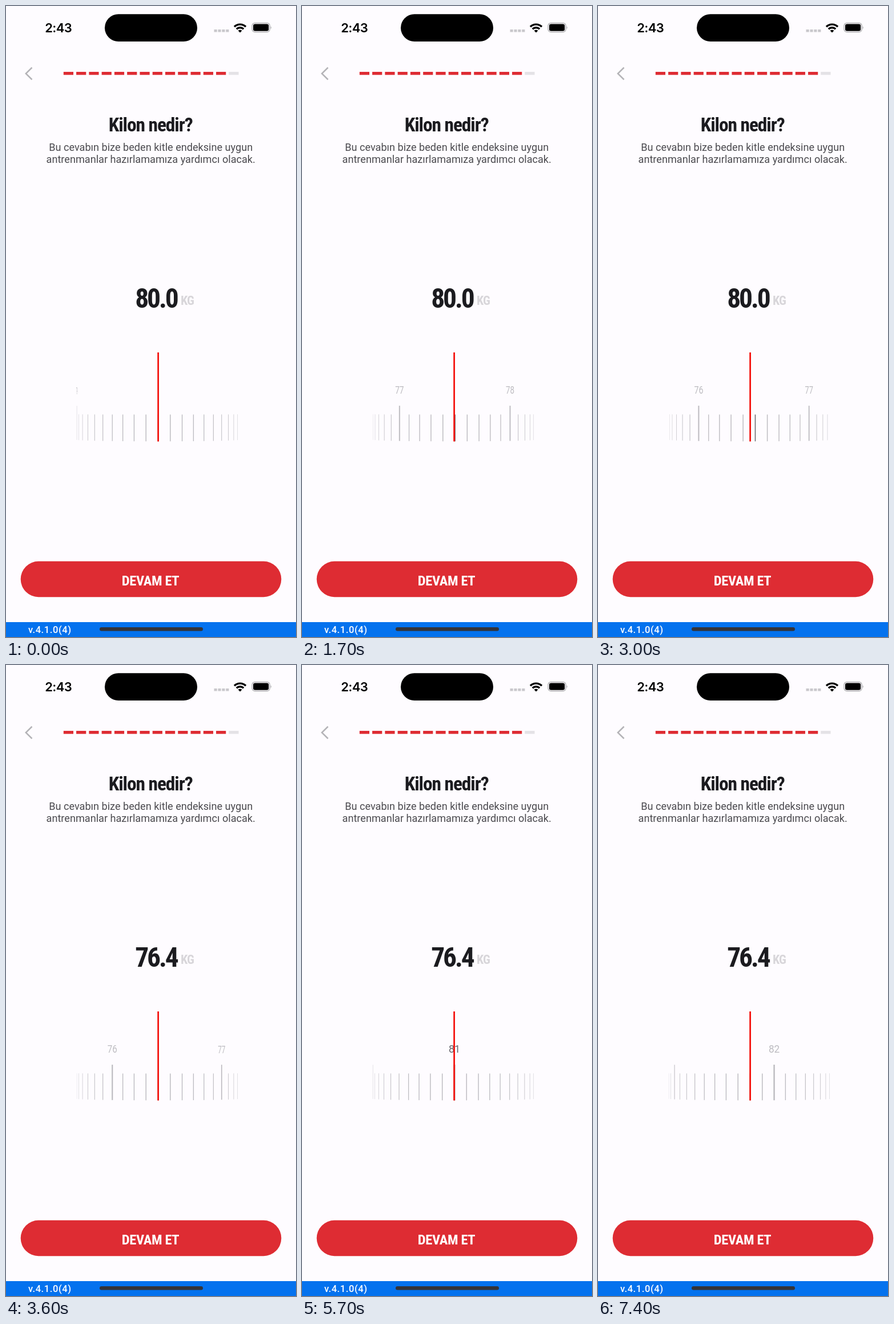
These frames come from a looping animation (508x1102 px, 7.5 s). An HTML page:

```html
<!DOCTYPE html>
<html lang="tr">
<head>
<meta charset="utf-8">
<title>Kilon nedir?</title>
<style>
  html, body { margin: 0; width: 100%; height: 100%; overflow: hidden; background: #fefcff; }
  svg { display: block; width: 508px; height: 1102px; font-family: Roboto, sans-serif; }
  .narrow { font-family: "Roboto Condensed", Roboto, sans-serif; font-stretch: 75%; font-weight: 700; fill: #1b1b1f; }
  .mid { text-anchor: middle; }
</style>
</head>
<body>
<svg viewBox="0 0 508 1102">
  <!-- status bar -->
  <text x="68.2" y="46" font-family="Inter, sans-serif" font-size="22" font-weight="600" letter-spacing="-.6">2:43</text>
  <rect x="173" y="14.3" width="162" height="47.8" rx="23.9"/>
  <path d="M364.5 43.3H391" stroke="#c9c8cc" stroke-width="4.6" stroke-dasharray="5.2 1.7"/>
  <g fill="none" stroke="#000" stroke-width="3.4">
    <path d="M400 36.2a14.4 14.4 0 0 1 20 0"/>
    <path d="M403.8 40.2a9 9 0 0 1 12.4 0"/>
  </g>
  <path d="M410 46.5l-3.4-3.5a4.9 4.9 0 0 1 6.8 0z"/>
  <rect x="431.1" y="29.6" width="31" height="16" rx="5" fill="none" stroke="#a9a8ac" stroke-width="1.3"/>
  <rect x="433" y="31.5" width="27.2" height="12.2" rx="3.3"/>
  <path d="M463.7 35.2q2.4 2.4 0 5z" fill="#a9a8ac"/>

  <!-- header -->
  <path d="M45.5 107.5L34.8 118l10.7 10.5" fill="none" stroke="#b4b3b7" stroke-width="2.5"/>
  <g id="steps"></g>
  <text class="narrow mid" x="253.2" y="219" font-size="33.5" letter-spacing="-1.1">Kilon nedir?</text>
  <g class="mid" font-size="18.13" fill="#4b4a4f">
    <text x="253.7" y="253">Bu cevabın bize beden kitle endeksine uygun</text>
    <text x="253.7" y="274">antrenmanlar hazırlamamıza yardımcı olacak.</text>
  </g>

  <!-- weight and ruler -->
  <text id="weight" class="narrow" x="299.7" y="527" font-size="47.5" letter-spacing="-3.1" text-anchor="end"></text>
  <text class="narrow" x="306" y="522" font-size="22" letter-spacing="-.8" style="fill:#d8d6da">KG</text>
  <clipPath id="window"><rect x="123" y="600" width="284" height="170"/></clipPath>
  <g clip-path="url(#window)"><g id="ruler" class="mid" font-size="18"></g></g>
  <rect x="265.2" y="605" width="2.8" height="155.5" fill="#f4140f"/>

  <!-- footer -->
  <rect x="25.7" y="969.8" width="456.6" height="62.4" rx="31.2" fill="#de2c33"/>
  <text class="narrow mid" x="253" y="1011.5" font-size="24.5" letter-spacing="-.4" style="fill:#fff">DEVAM ET</text>
  <rect y="1076" width="508" height="26" fill="#0472ee"/>
  <text x="39" y="1095" font-size="16.5" font-weight="500" letter-spacing=".6" fill="#fff">v.4.1.0(4)</text>
  <rect x="164" y="1085" width="181" height="6.5" rx="3.25" fill="#333338"/>
</svg>
<script>
const byId = id => document.getElementById(id);
const LOOP = 7500, STEP = 100, CLIMB = 4800;
const CENTER = 266.5, AXIS = 704, RADIUS = 151, TICK_ANGLE = 0.1415, DEPTH = 0.056;

byId('steps').innerHTML = Array.from({ length: 14 }, (_, i) =>
  `<rect x="${100.8 + i * 22.27}" y="115" width="17.2" height="5.3" fill="${i < 13 ? '#de2c33' : '#e4e2e6'}"/>`).join('');

// Distance left in a fling that comes to rest at time `end`
const remaining = (t, end, scale, distance) =>
  Math.max(0, Math.min(distance, scale * (Math.exp((end - t) / 500) - 1)));

function rulerValue(t) {
  if (t < 1200) return 80;
  if (t < CLIMB) return 76.4 + remaining(t, 3600, 0.025, 3.6);
  return 81.8 - remaining(t, 7400, 0.0277, 5.4);
}

function tick(index, position, t) {
  const angle = (index - position) * TICK_ANGLE;
  const cos = Math.cos(angle);
  const zoom = 1 / (1 + DEPTH * (1 - cos));
  const x = CENTER + RADIUS * Math.sin(angle) * zoom;
  const current = Math.round(position);
  // 80 is a plain tick until the first fling has ended
  const major = index % 10 === 0 && !(index === 800 && t < 3600);
  // While climbing, numbers already passed lose their label
  const labelled = major && !(t >= CLIMB && index < current);
  const [width, top] = major ? [2.6, -6] : [1.5, 9.5];
  const label = labelled ? `<text y="-27">${index / 10}</text>` : '';
  return `<g transform="translate(${x} ${AXIS}) scale(${cos * zoom} ${zoom})" fill="${index === current ? '#66656b' : '#bdbcc1'}">
    <rect x="${-width / 2}" y="${top}" width="${width}" height="${56.3 - top}"/>${label}</g>`;
}

function draw(now) {
  const t = Math.floor(now % LOOP / STEP) * STEP;
  const position = rulerValue(t) * 10;
  const first = Math.ceil(position - 10.05);
  byId('weight').textContent = t < 3600 ? '80.0' : '76.4';
  byId('ruler').innerHTML = Array.from({ length: 20 }, (_, i) => tick(first + i, position, t)).join('');
}

let start;
function loop(now) {
  start ??= now;
  draw(now - start);
  requestAnimationFrame(loop);
}
draw(0);
requestAnimationFrame(loop);
</script>
</body>
</html>
```
